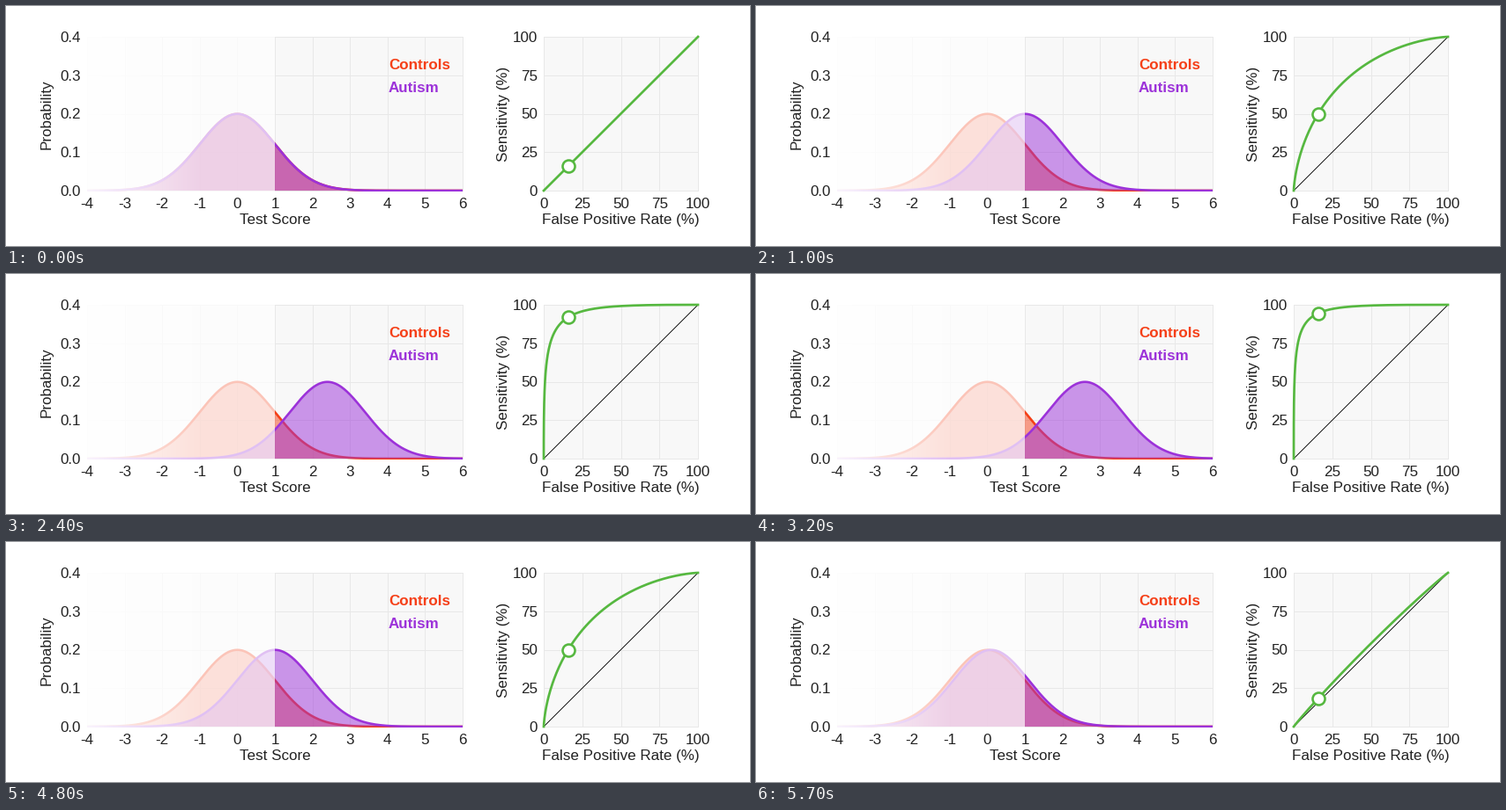
Write a matplotlib script that moves like this. It is 844 px wide and 273 px high and loops after 5800 ms.

```python
import math

import matplotlib.pyplot as plt
import numpy as np
from matplotlib.animation import FuncAnimation
from matplotlib.patches import Polygon, Rectangle

W, H, DPI = 844, 273, 100
FRAMES, INTERVAL = 58, 100
PX = 72 / DPI  # points per pixel

RED, PURPLE, GREEN = "#f53f17", "#9c32d9", "#56b840"
PANEL, GRID, INK = "#f8f8f8", "#e8e8e8", "#222222"
TOP, BASE = 35, 210
CUTOFF = 1

plt.rcParams["font.family"] = "Liberation Sans"
fig = plt.figure(figsize=(W / DPI, H / DPI), dpi=DPI, facecolor="white")
ax = fig.add_axes([0, 0, 1, 1])
ax.set(xlim=(0, W), ylim=(H, 0))
ax.axis("off")


def score_x(s):
    return 92 + 42.6 * (s + 4)


def prob_y(p):
    return BASE - 437.5 * p


def rate_x(r):
    return 610 + 175 * r


def rate_y(r):
    return BASE - 175 * r


def pdf(s):
    return np.exp(-s ** 2 / 2) / (2 * math.sqrt(2 * math.pi))


@np.vectorize
def cdf(s):
    return 0.5 * (1 + math.erf(s / math.sqrt(2)))


def label(x, y, text, ha="center", **kw):
    style = dict(fontsize=17 * PX, color=INK, ha=ha, va="baseline",
                 rotation_mode="anchor")
    ax.text(x, y, text, **{**style, **kw})


def panel(x0, x1, xticks, yticks):
    """Background and grid; ticks are (pixel position, label) pairs."""
    ax.add_patch(Rectangle((x0, TOP), x1 - x0, BASE - TOP, fc=PANEL, lw=0, zorder=0))
    line = dict(color=GRID, lw=PX, zorder=1, snap=True)
    for x, text in xticks:
        ax.plot([x, x], [TOP, BASE], **line)
        label(x, 230, text)
    for y, text in yticks:
        ax.plot([x0, x1], [y, y], **line)
        label(x0 - 7, y + 6, text, ha="right")


panel(92, 518,
      [(score_x(s), str(s)) for s in range(-4, 7)],
      [(prob_y(k / 10), f"{k / 10:.1f}") for k in range(5)])
rates = range(0, 101, 25)
panel(610, 785,
      [(rate_x(r / 100), str(r)) for r in rates],
      [(rate_y(r / 100), str(r)) for r in rates])

label(305.5, 248, "Test Score")
label(697.5, 248, "False Positive Rate (%)")
label(50.5, 123, "Probability", rotation=90)
label(568.5, 123, "Sensitivity (%)", rotation=90)
label(434, 72, "Controls", ha="left", color=RED, weight="bold")
label(434, 98, "Autism", ha="left", color=PURPLE, weight="bold")

# Score distributions
scores = np.linspace(-4, 6, 401)
clip = Rectangle((92, TOP), 426, BASE + 1 - TOP, transform=ax.transData)


def bell_points(mean):
    return np.column_stack([score_x(scores), prob_y(pdf(scores - mean))])


def closed(pts):
    return np.vstack([[pts[0, 0], BASE], pts, [pts[-1, 0], BASE]])


def bell(color, z):
    pts = bell_points(0)
    fill = ax.add_patch(Polygon(closed(pts), fc=color, alpha=0.5, lw=0, zorder=z))
    line, = ax.plot(*pts.T, color=color, lw=2.6 * PX, zorder=z + 0.5)
    line.set_clip_path(clip)
    return fill, line


bell(RED, 2)
autism_fill, autism_line = bell(PURPLE, 3)

# White veil below the cutoff, denser toward the left edge
cut_x = score_x(CUTOFF)
veil = np.ones((1, 213, 4))
veil[0, :, 3] = np.interp(np.linspace(0, 1, 213), [0, 0.6], [0.95, 0.7])
ax.imshow(veil, extent=(92, cut_x, BASE + 2, TOP - 1), aspect="auto",
          interpolation="nearest", zorder=5)
ax.set(xlim=(0, W), ylim=(H, 0))

# ROC curve
cuts = np.linspace(-5, 8, 400)
ax.plot([610, 785], [BASE, TOP], color="black", lw=0.9 * PX, zorder=2)
roc, = ax.plot([], [], color=GREEN, lw=2.7 * PX, zorder=6)
dot, = ax.plot([], [], "o", ms=14 * PX, mfc="white", mec=GREEN,
               mew=2.6 * PX, zorder=7)


def update(i):
    shift = min(i, FRAMES - i) / 10
    pts = bell_points(shift)
    autism_fill.set_xy(closed(pts))
    autism_line.set_data(*pts.T)
    roc.set_data(rate_x(cdf(-cuts)), rate_y(cdf(shift - cuts)))
    dot.set_data([rate_x(cdf(-CUTOFF))], [rate_y(cdf(shift - CUTOFF))])
    return autism_fill, autism_line, roc, dot


anim = FuncAnimation(fig, update, frames=FRAMES, interval=INTERVAL,
                     repeat=True, repeat_delay=0, blit=False)
plt.show()
```
